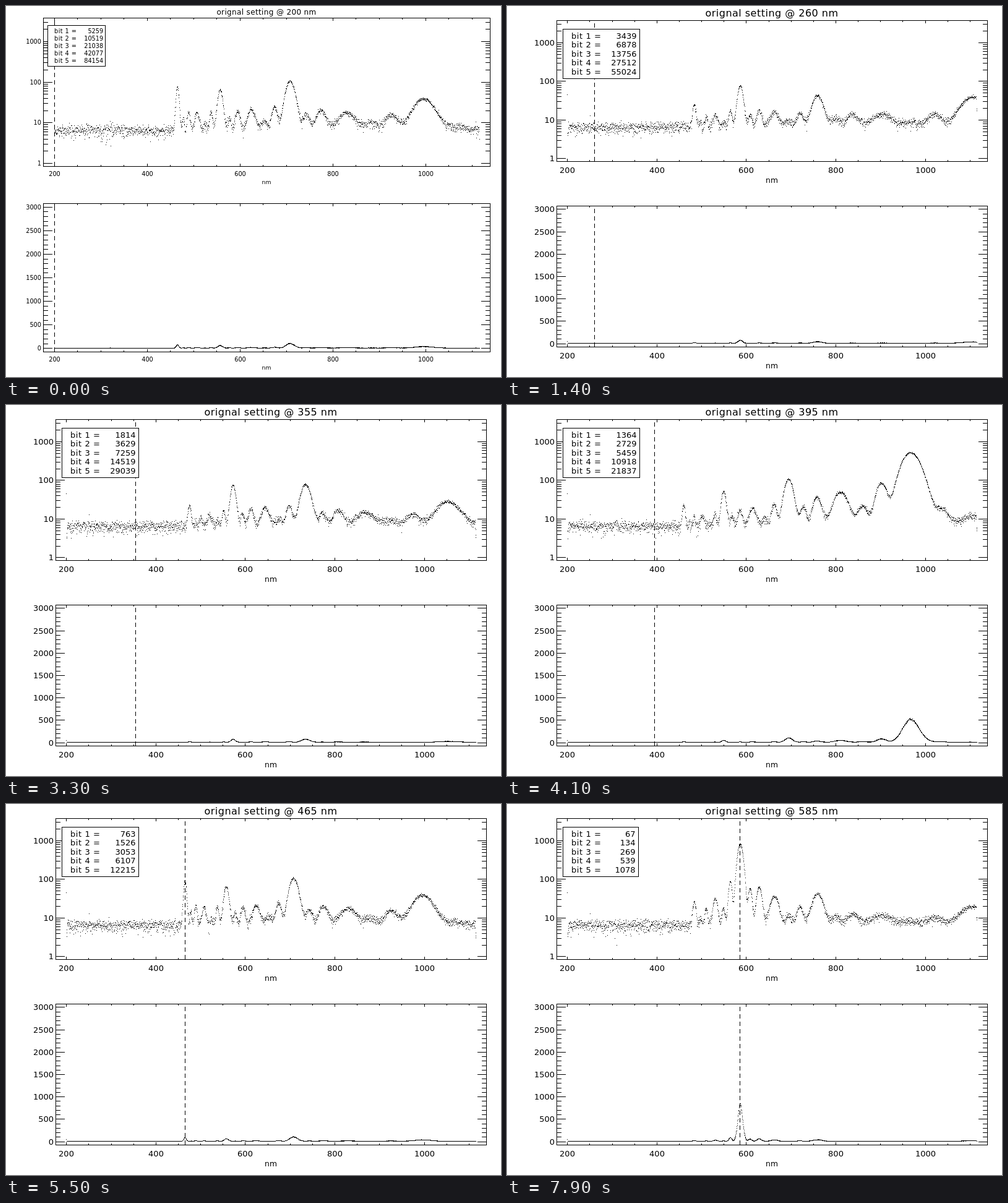
Recreate the animation shown at these times as an HTML page with a canvas. Size 800 by 600 pixels, loop 8000 ms.

```html
<!DOCTYPE html>
<html>
<head>
<meta charset="utf-8">
<style>
html, body { margin: 0; width: 800px; height: 600px; overflow: hidden; background: #fff; }
canvas { display: block; }
</style>
</head>
<body>
<canvas id="stage" width="800" height="600"></canvas>
<script>
const ctx = document.getElementById('stage').getContext('2d');
const POINTS = 2048;
const ORDERS = 4;

const bump = (x, center, width) => Math.exp(-(((x - center) / width) ** 2));

// The whole page is laid out in multiples of the character cell.
function layout(cw, ch) {
  const left = 10 * cw, right = 800 - 3 * cw;
  return {
    cw, ch, left, right, mid: (left + right) / 2,
    top: 2 * ch - 1, height: 300 - 6 * ch, font: 13 * cw / 8,
    xOf: w => left + (w - 176) * (right - left) / 963
  };
}
const small = layout(6, 10), large = layout(8, 12);

// Steps of the first motor for a wavelength; each further one takes twice as many.
const motor = nm => 1577896 * (1 / nm - 1 / 600);

// Filter phase with dispersion, and its inverse by iteration.
const phaseOf = w => 2226.9 / w + 5.025e7 / w ** 3;
function waveOf(phase) {
  let w = 700;
  for (let i = 0; i < 12; i++) w = 2226.9 / (phase - 5.025e7 / w ** 3);
  return w;
}

const wave = Array.from({ length: POINTS }, (_, i) => 200 + 916 * i / (POINTS - 1));
const phase = wave.map(phaseOf);

// Side lobes between two main peaks: phase offset, relative height, width.
const sides = [
  [0.165, 0.1, 0.035], [0.305, 0.18, 0.045], [0.515, 0.18, 0.065],
  [0.69, 0.045, 0.04], [0.82, 0.2, 0.04]
];

// Settings at which the stages happen to line up: setting, wavelength, gain.
const matches = [[200, 465, 1.75], [260, 1093, 1], [310, 557, 2], [395, 968, 2.6]];

function mainHeight(w, nm) {
  const lamp = 100 * bump(Math.log(w / 720), 0, 0.3) * (1 - 0.65 * bump(w, 757, 25));
  let gain = 2.6 * bump(nm, 600, 260) * bump(w, nm, 60);
  for (const [s, at, g] of matches) gain += g * bump(nm, s, 30) * bump(w, at, 60);
  return lamp * Math.exp(gain);
}

function lobesAt(nm) {
  const turn = 0.287 + (motor(nm) - 763.47) / 562;
  const first = 5 + turn - Math.floor(turn);
  const lobes = [];
  for (let k = 0; k < ORDERS; k++) {
    const p = first - k, spread = 0.95 + 0.07 * k;
    const a = mainHeight(waveOf(p), nm), b = mainHeight(waveOf(p - 1), nm);
    lobes.push({ at: p, h: a, w: 0.057 * spread });
    for (const [d, rel, w] of sides)
      lobes.push({ at: p - d, h: rel * a ** (1 - d) * b ** d, w: w * spread });
  }
  return lobes;
}

function random(seed) {
  let s = seed;
  return () => {
    s = s + 0x6D2B79F5 | 0;
    let r = Math.imul(s ^ s >>> 15, 1 | s);
    r = r + Math.imul(r ^ r >>> 7, 61 | r) ^ r;
    return ((r ^ r >>> 14) >>> 0) / 4294967296;
  };
}

function spectrum(step, nm) {
  const lobes = lobesAt(nm);
  const rnd = random(step * 7919 + 17);
  const gauss = () => Math.sqrt(-2 * Math.log(1 - rnd())) * Math.cos(2 * Math.PI * rnd());
  const values = wave.map((w, i) => {
    let v = 6.4 + 1.5 * bump(w, 850, 230);
    for (const p of lobes) v += p.h * bump(phase[i], p.at, p.w);
    return Math.max(1.5, v + gauss() * (1 + 0.02 * v));
  });
  if (step > 0) {
    // Hot pixels and the dim edges of the detector.
    values[0] = 46;
    values[112] = 13;
    for (let i = 1; i < 4; i++) {
      values[i] *= 0.6;
      values[POINTS - i] *= 0.5;
    }
  }
  return values;
}

function text(str, x, y, size, align, spacing = 0) {
  ctx.font = `${size}px "DejaVu Sans", sans-serif`;
  ctx.letterSpacing = spacing + 'px';
  ctx.textAlign = align;
  ctx.fillText(str, x, y);
}

function drawPanel(L, top, yOf, yTicks, nm, values) {
  const { left, right, height, xOf } = L, bottom = top + height;
  ctx.strokeRect(left + 0.5, top + 0.5, right - left, height);

  for (let w = 200; w <= 1100; w += 50) {
    const x = Math.round(xOf(w)), major = w % 200 === 0, len = major ? 5 : 3;
    ctx.fillRect(x, top, 1, len);
    ctx.fillRect(x, bottom - len + 1, 1, len);
    if (major) text(w, x + 0.5, Math.round(bottom + 1.6 * L.ch), L.font, 'center');
  }
  text('nm', L.mid, Math.round(bottom + 2.9 * L.ch), L.font * 0.95, 'center');

  for (const [v, major] of yTicks) {
    const y = Math.round(yOf(v)), len = major ? 15 : 8;
    if (y <= top || y >= bottom) continue;
    ctx.fillRect(left, y, len, 1);
    ctx.fillRect(right - len + 1, y, len, 1);
    if (major) text(v, left - 3, Math.round(y + 0.37 * L.font), L.font, 'right');
  }

  values.forEach((v, i) => ctx.fillRect(Math.round(xOf(wave[i])), Math.round(yOf(v)), 1, 1));

  const x = Math.round(xOf(nm)) + 0.5;
  ctx.setLineDash([7, 5]);
  ctx.beginPath();
  ctx.moveTo(x, bottom);
  ctx.lineTo(x, top);
  ctx.stroke();
  ctx.setLineDash([]);
}

function drawLegend(L, nm) {
  const { cw, ch, left, top } = L;
  const bits = [0, 1, 2, 3, 4].map(n => Math.floor(motor(nm) * 2 ** n));
  const trim = bits[4] < 10000 ? 2 : 0;
  const x = Math.floor(left + 1.25 * cw), y = Math.floor(top + 1.2 * ch);
  const w = 15.5 * cw - trim, h = Math.ceil(6.6 * ch);
  ctx.fillStyle = '#fff';
  ctx.fillRect(x, y, w, h);
  ctx.fillStyle = '#000';
  ctx.strokeRect(x + 0.5, y + 0.5, w, h);
  bits.forEach((b, n) => {
    const line = Math.round(top + (2.5 + 1.2 * n) * ch);
    text(`bit ${n + 1} =`, left + 3 * cw, line, L.font, 'left', L.font * 0.045);
    text(b, left + 16.2 * cw - trim, line, L.font, 'right');
  });
}

const logTicks = [];
for (let d = 1; d <= 1000; d *= 10)
  for (let m = 1; m < 10; m++) logTicks.push([d * m, m === 1]);
const linearTicks = Array.from({ length: 31 }, (_, i) => [i * 100, i % 5 === 0]);

function draw(step) {
  const L = step ? large : small;
  const nm = Math.max(200, 190 + 5 * step);
  const values = spectrum(step, nm);
  const base = L.top + L.height;
  const logY = v => base - L.height * (0.02 + 0.274 * Math.log10(v));
  const linearY = v => base + 300 - L.height * (v + 75) / 3150;
  ctx.fillStyle = '#fff';
  ctx.fillRect(0, 0, 800, 600);
  ctx.fillStyle = ctx.strokeStyle = '#000';
  ctx.lineWidth = 1;
  text(`orignal setting @ ${nm} nm`, L.mid, Math.round(1.4 * L.ch), 2 * L.cw, 'center', 0.06 * L.cw);
  drawPanel(L, L.top, logY, logTicks, nm, values);
  drawPanel(L, L.top + 300, linearY, linearTicks, nm, values);
  drawLegend(L, nm);
}

let shown = -1;
const start = performance.now();
function tick() {
  const step = Math.floor((performance.now() - start) / 100) % 80;
  if (step !== shown) draw(shown = step);
  requestAnimationFrame(tick);
}
tick();
</script>
</body>
</html>
```
